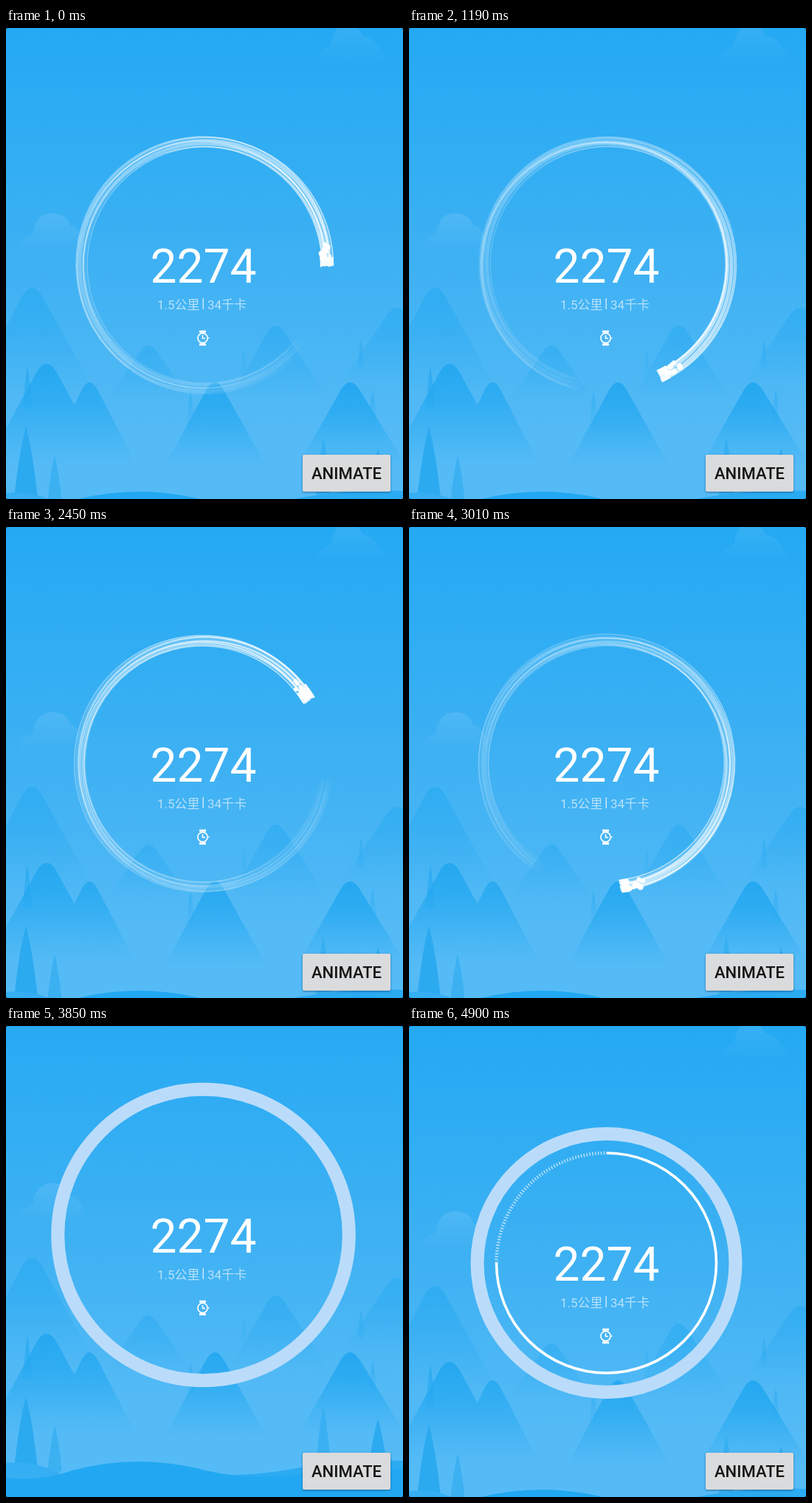
Recreate the animation shown at these times as an HTML page with a canvas. Size 538 px wide and 638 px high, loop 4970 ms.

```html
<!DOCTYPE html>
<html lang="zh">
<head>
<meta charset="utf-8">
<title>Step counter</title>
<style>
  html, body { margin: 0; width: 100%; height: 100%; overflow: hidden; background: #0d4a70; }
  #stage { position: relative; width: 538px; height: 638px; overflow: hidden; border-radius: 4px; background: #24a9f3; }
  svg, canvas { position: absolute; left: 0; top: 0; display: block; }
  text { font-family: Roboto, "Noto Sans CJK SC", "Noto Sans CJK", sans-serif; fill: #fff; }
  .info { font-size: 17px; fill-opacity: .62; }
  button {
    position: absolute; left: 402px; top: 578px; width: 119px; height: 50px; padding: 0;
    border: 0; border-radius: 2px; background: #dadbdc; color: #141414;
    font: 500 22px/52px Roboto, sans-serif; box-shadow: 0 1px 3px rgba(0, 40, 80, .5);
  }
</style>
</head>
<body>
<div id="stage">
  <svg id="scene" width="538" height="700">
    <defs>
      <linearGradient id="sky" x2="0" y2="1">
        <stop offset="0" stop-color="#24a9f3"/>
        <stop offset=".46" stop-color="#3eb1f3"/>
        <stop offset=".8" stop-color="#55bbf6"/>
        <stop offset="1" stop-color="#55bbf6"/>
      </linearGradient>
      <linearGradient id="rock" x2="0" y2="1">
        <stop offset="0" stop-color="#1fa6f0"/>
        <stop offset=".35" stop-color="#1fa6f0" stop-opacity=".75"/>
        <stop offset="1" stop-color="#1fa6f0" stop-opacity="0"/>
      </linearGradient>
      <linearGradient id="mist" x2="0" y2="1">
        <stop offset="0" stop-color="#7fcaf8" stop-opacity=".3"/>
        <stop offset="1" stop-color="#7fcaf8" stop-opacity="0"/>
      </linearGradient>
    </defs>
    <rect width="538" height="700" fill="url(#sky)"/>
    <path fill="url(#mist)" d="M16 306Q18 283 36 281Q40 251 62 251Q83 251 87 268Q104 270 108 306Z"/>
    <path fill="url(#mist)" opacity=".7" d="M418 46Q424 28 440 24Q444 -4 461 -4Q478 -4 483 10Q502 12 516 46Z"/>
    <g id="land"></g>
    <path fill="#35aef3" d="M0 630Q40 625 84 650V700H0Z"/>
    <path fill="#2babf2" d="M250 646Q330 650 400 636Q470 624 538 627V700H250Z"/>
    <path fill="#22a8f2" d="M0 650Q50 655 90 640Q180 616 270 640Q350 658 430 640Q490 632 538 640V700H0Z"/>
  </svg>
  <canvas id="rings" width="538" height="638"></canvas>
  <svg id="label" width="538" height="700">
    <text x="267.5" y="345" font-size="64" text-anchor="middle">2274</text>
    <text class="info" x="205" y="381">1.5公里</text>
    <rect x="266.5" y="366" width="1.5" height="15" fill="#fff" opacity=".7"/>
    <text class="info" x="273" y="381">34千卡</text>
    <g fill="none" stroke="#fff" stroke-width="1.6">
      <circle cx="266.5" cy="420" r="6.6"/>
      <path d="M266.5 416V420.5H270M274 420H275.5"/>
      <path stroke-width="3" d="M262 411.3H271M262 428.7H271"/>
    </g>
  </svg>
  <button type="button">ANIMATE</button>
</div>
<script>
const LOOP = 4970, CX = 267.5, CY = 321, RAD = Math.PI / 180;
const $ = id => document.getElementById(id);
const scene = $('scene'), label = $('label'), ctx = $('rings').getContext('2d');

// Landscape
const peak = (x, y, l, r, h) =>
  `M${x - l} ${y + h}L${x - l * .2} ${y + h * .12}Q${x} ${y - h * .12} ${x + r * .2} ${y + h * .12}L${x + r} ${y + h}Z`;
const tree = (x, y, w, h) =>
  `M${x} ${y}Q${x + w * .3} ${y + h * .35} ${x + w / 2} ${y + h * .93}Q${x} ${y + h * 1.07} ${x - w / 2} ${y + h * .93}Q${x - w * .3} ${y + h * .35} ${x} ${y}Z`;
const fill = (d, opacity, paint = 'url(#rock)') => `<path d="${d}" fill="${paint}" opacity="${opacity}"/>`;
$('land').innerHTML = [
  fill(peak(35, 352, 80, 85, 140), .5),
  fill(peak(193, 430, 58, 58, 75), .4),
  fill(peak(365, 403, 62, 72, 100), .45),
  fill(peak(530, 379, 78, 78, 105), .45),
  fill(tree(322, 435, 8, 42) + tree(481, 421, 9, 42), .4),
  fill(tree(29, 458, 12, 60) + tree(250, 492, 11, 50) + tree(497, 490, 11, 50), .7),
  fill(peak(55, 455, 82, 82, 137) + peak(113, 480, 60, 64, 112), .85),
  fill(peak(283, 480, 69, 71, 116), .85),
  fill(peak(466, 480, 70, 76, 112), .9),
  fill(tree(27, 540, 31, 100) + tree(504, 570, 25, 72) + 'M26 630H29V655H26Z', .9, '#28a9f0'),
  fill(tree(66, 579, 19, 65) + tree(430, 554, 21, 88), .6, '#2babf1')
].join('');

// Piecewise linear value from [time, value] pairs
function track(keys, t) {
  const i = Math.max(1, keys.findIndex(k => k[0] >= t));
  const [t0, a] = keys[i - 1], [t1, b] = keys[i];
  return a + (b - a) * (t - t0) / (t1 - t0);
}
const ramp = (t, a, b) => Math.min(1, Math.max(0, (t - a) / (b - a)));
const spin = [[0, 0], [1190, 424], [1890, 573.7], [3010, 803], [LOOP, 1210]];

function lift(t) {
  if (t < 4120) return 53.6 * (1 - (1 - ramp(t, 3620, 4120)) ** 2);
  return 53.6 * (1 - ramp(t, 4120, 4760) ** 2);
}

function random(seed) {
  return () => {
    seed = (seed * 1664525 + 1013904223) >>> 0;
    return seed / 4294967296;
  };
}

function arc(x, y, r, from, to, width) {
  ctx.lineWidth = width;
  ctx.beginPath();
  ctx.arc(x, y, r, from * RAD, to * RAD);
  ctx.stroke();
}

function comet(t) {
  const rnd = random(Math.floor(t / 70) * 7919 + 17);
  ctx.save();
  ctx.translate(268, CY);
  ctx.rotate(track(spin, t) * RAD);

  const glow = ctx.createConicGradient(0, 0, 0);
  [[0, 0], [.1, 0], [.13, .1], [.4, .3], [.7, .55], [.9, .85], [1, 1]]
    .forEach(([p, a]) => glow.addColorStop(p, `rgba(255,255,255,${a})`));
  ctx.strokeStyle = glow;
  const base = ctx.globalAlpha;
  ctx.globalAlpha = base * .36;
  arc(0, 0, 167, 38, 359.9, 14);
  ctx.globalAlpha = base * .72;
  for (let i = 0; i < 9; i++) {
    const phase = i * 2.4 + t / 900 * (i % 2 ? 1 : -1);
    arc(2 * Math.cos(phase), 2 * Math.sin(phase), 160 + i * 1.7, 38, 359.9, 1.5);
  }

  // Ragged head and sparks
  ctx.globalAlpha = base;
  ctx.strokeStyle = ctx.fillStyle = '#fff';
  for (let i = 0; i < 7; i++) arc(0, 0, 159 + i * 2.6, -3 - rnd() * 4, rnd() * .8, 2.4);
  for (let i = 0; i < 11; i++) {
    const a = -(1.5 + rnd() * 9.5) * RAD, r = 160 + rnd() * 14;
    ctx.beginPath();
    ctx.arc(r * Math.cos(a), r * Math.sin(a), 2.6 + rnd() * 1.4, 0, 7);
    ctx.fill();
  }
  ctx.restore();
}

function halo(t, up) {
  ctx.strokeStyle = '#badcfa';
  arc(CX, CY - up, 175 + up * .585, 0, 360, 18);
}

function progress(up) {
  ctx.strokeStyle = '#fff';
  arc(CX, CY - up, 149, -90, 180, 3.6);
  ctx.strokeStyle = 'rgba(255,255,255,.65)';
  ctx.setLineDash([1.5, 2.4]);
  arc(CX, CY - up, 149, 180, 270, 4.5);
  ctx.setLineDash([]);
}

function layer(alpha, draw) {
  if (alpha <= 0) return;
  ctx.globalAlpha = alpha;
  draw();
  ctx.globalAlpha = 1;
}

function frame() {
  const t = performance.now() % LOOP, up = lift(t), done = ramp(t, 3540, 3620);
  scene.style.transform = label.style.transform = `translateY(${-up}px)`;
  ctx.clearRect(0, 0, 538, 638);
  layer(1 - done, () => comet(t));
  layer(done, () => halo(t, up));
  layer(ramp(t, 4450, 4760), () => progress(up));
  requestAnimationFrame(frame);
}
frame();
</script>
</body>
</html>
```
